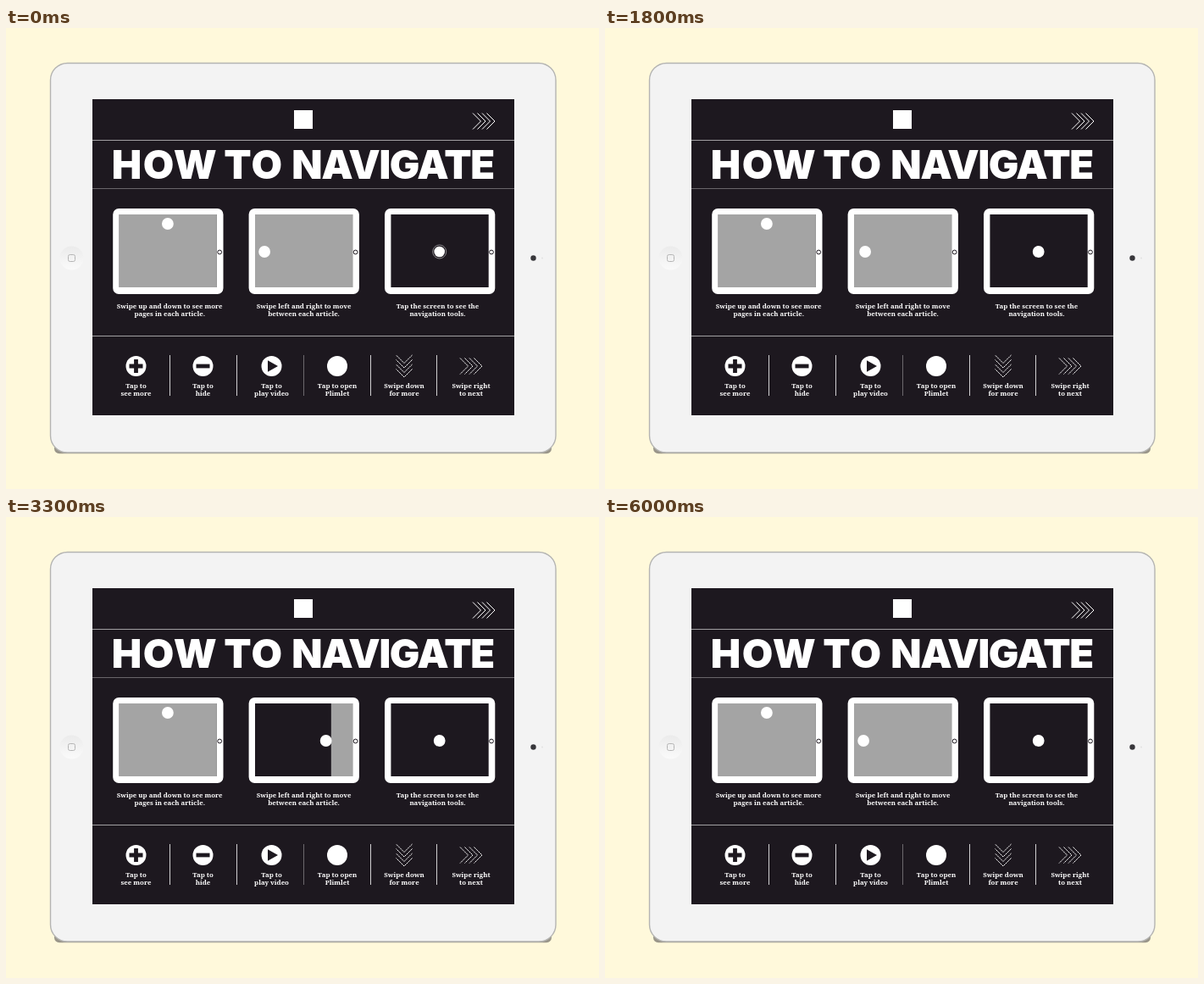
Write an HTML page that moves like this. It is 700 by 544 pixels and loops after 6.1 s.

```html
<!DOCTYPE html>
<html lang="en">
<head>
<meta charset="utf-8">
<title>How to navigate</title>
<style>
  html, body { margin: 0; width: 100%; height: 100%; overflow: hidden; background: #fff9db; }
  svg { display: block; width: 700px; height: 544px; }
  .title { font: 900 47.2px Inter, sans-serif; letter-spacing: 1.5px; }
  .title .tight { letter-spacing: -1.3px; }
  .small { font: 700 7.85px "Noto Serif", serif; }
  text { fill: #fff; text-anchor: middle; }
  .chevrons { fill: none; stroke: #fff; stroke-width: 1; }
  .dashed { stroke-dasharray: 2 .6; }
</style>
</head>
<body>
<svg viewBox="0 0 700 544">
  <defs>
    <linearGradient id="button" x2="0" y2="1">
      <stop stop-color="#ebebeb"/><stop offset="1" stop-color="#fafafa"/>
    </linearGradient>
    <clipPath id="glass"><rect x="7.4" y="7" width="115.3" height="86"/></clipPath>
    <path id="arrows" d="M-13 -9.5l9.5 9.5l-9.5 9.5m5.5 -19l9.5 9.5l-9.5 9.5m5.5 -19l9.5 9.5l-9.5 9.5m5.5 -19l9.5 9.5l-9.5 9.5"/>
  </defs>

  <rect x="57" y="480" width="587" height="22.3" rx="6" fill="#9a968a"/>
  <rect x="52.5" y="41.5" width="596.5" height="459.5" rx="20" fill="#f3f3f3" stroke="#b4b4b2" stroke-width="1.4"/>
  <circle cx="77.5" cy="271.5" r="14" fill="url(#button)"/>
  <rect x="73.5" y="267.5" width="8" height="8" rx="2" fill="none" stroke="#b5b5b5"/>
  <circle cx="622.5" cy="271.5" r="3.2" fill="#37363a"/>
  <circle cx="633" cy="271.5" r="1" fill="#e2e2e2"/>

  <rect x="102" y="84" width="498" height="373" fill="#1d181f"/>
  <path d="M102 132.5h498M102 363.5h498" stroke="#a19fa2"/>
  <path d="M102 189.5h498" stroke="#69656a"/>
  <rect x="340" y="97" width="22" height="22" fill="#fff"/>
  <use href="#arrows" class="chevrons" transform="translate(564 110)"/>
  <g class="title">
    <text x="187.5" y="178">HOW</text>
    <text x="292.5" y="178">TO</text>
    <text class="tight" x="456.5" y="178">NAVIGATE</text>
  </g>

  <g id="devices"></g>
  <g id="tools"></g>
</svg>
<script>
const LOOP = 6100, STEP = 100;
const DARK = '#1d181f', GRAY = '#a4a4a4';
const $ = id => document.getElementById(id);
const set = (id, attrs) => {
  for (const key in attrs) $(id).setAttribute(key, attrs[key]);
};
const lines = (x, y, rows) => rows.map((row, i) =>
  `<text class="small" x="${x}" y="${y + i * 9.3}">${row}</text>`).join('');

const panel = (id, height, fill = GRAY) =>
  `<rect id="${id}" x="7" y="7" width="116" height="${height}" fill="${fill}"/>`;
const devices = [
  [panel('pageV', 86), 'dotV', 67, ['Swipe up and down to see more', 'pages in each article.']],
  [panel('pageH', 86), 'dotH', 65, ['Swipe left and right to move', 'between each article.']],
  [panel('barTop', 6) + panel('barBottom', 6) +
    '<circle id="ring" cx="64.7" cy="51" r="8" fill="none" stroke="#89868a"/>',
    'dotTap', 62.5, ['Tap the screen to see the', 'navigation tools.']]
];
$('devices').innerHTML = devices.map(([content, dot, center, caption], i) => `
  <g transform="translate(${126.2 + i * 160.4} 213)">
    <rect width="130.3" height="101" rx="7" fill="#fff"/>
    <g clip-path="url(#glass)">${panel('glass' + i, 86, DARK)}${content}</g>
    <circle id="${dot}" cx="64.7" cy="51" r="6.9" fill="#fff"/>
    <circle cx="126" cy="51.5" r="2.4" fill="#fff" stroke="${DARK}"/>
    ${lines(center, 118, caption)}
  </g>`).join('');

const disc = mark => `<circle r="12" fill="#fff"/><path d="${mark}" fill="${DARK}"/>`;
const chevrons = angle => `<use href="#arrows" class="chevrons dashed" transform="rotate(${angle})"/>`;
const tools = [
  [153.5, disc('M-8 -2.4h5.6v-5.6h4.8v5.6h5.6v4.8h-5.6v5.6h-4.8v-5.6h-5.6z'), ['Tap to', 'see more']],
  [232.5, disc('M-8 -2.4h16v4.8h-16z'), ['Tap to', 'hide']],
  [313.5, disc('M-4.5 -6.8l12 6.8l-12 6.8z'), ['Tap to', 'play video']],
  [391, disc(''), ['Tap to open', 'Plimlet']],
  [470, chevrons(90), ['Swipe down', 'for more']],
  [549, chevrons(0), ['Swipe right', 'to next']]
];
$('tools').innerHTML = tools.map(([x, icon, caption], i) => `
  <g transform="translate(${x} 399)">${icon}${lines(0, 26, caption)}</g>
  ${i ? `<path d="M${Math.round(114.4 + i * 78.8) + .5} 386v48" stroke="#fff" opacity="${i === 3 ? .35 : .8}"/>` : ''}`).join('');

const ease = u => {
  u = Math.min(1, Math.max(0, u));
  return u < .5 ? 2 * u * u : 1 - 2 * (1 - u) ** 2;
};
// Rises from 0 to 1 after `start`, falls back after `back`.
const swing = (t, start, back, span) => ease((t - start) / span) - ease((t - back) / span);
const within = (t, from, length) => t >= from && t < from + length;

function draw(now) {
  const t = Math.floor(now % LOOP / STEP) * STEP;

  set('pageV', { y: 7 + 86 * swing(t, 100, 1000, 600) });
  set('dotV', { cy: 18 + 62.5 * swing(t, 0, 1000, 600) });

  const left = within(t, 100, 2000) ? 20.5 : 18.5;
  set('pageH', { x: 7 + 116 * swing(t, 2100, 3100, 600) });
  set('dotH', { cx: left + (111.8 - left) * swing(t, 2000, 3100, 600) });

  const shown = 6 * swing(t, 4300, 5300, 400);
  set('barTop', { y: 1 + shown });
  set('barBottom', { y: 93 - shown });
  const tapped = [0, 4300, 5300].some(from => within(t, from, from ? 200 : 100));
  set('ring', { visibility: tapped ? 'visible' : 'hidden' });
  set('dotTap', { r: tapped ? 6.3 : 6.9 });

  requestAnimationFrame(draw);
}
requestAnimationFrame(draw);
</script>
</body>
</html>
```
